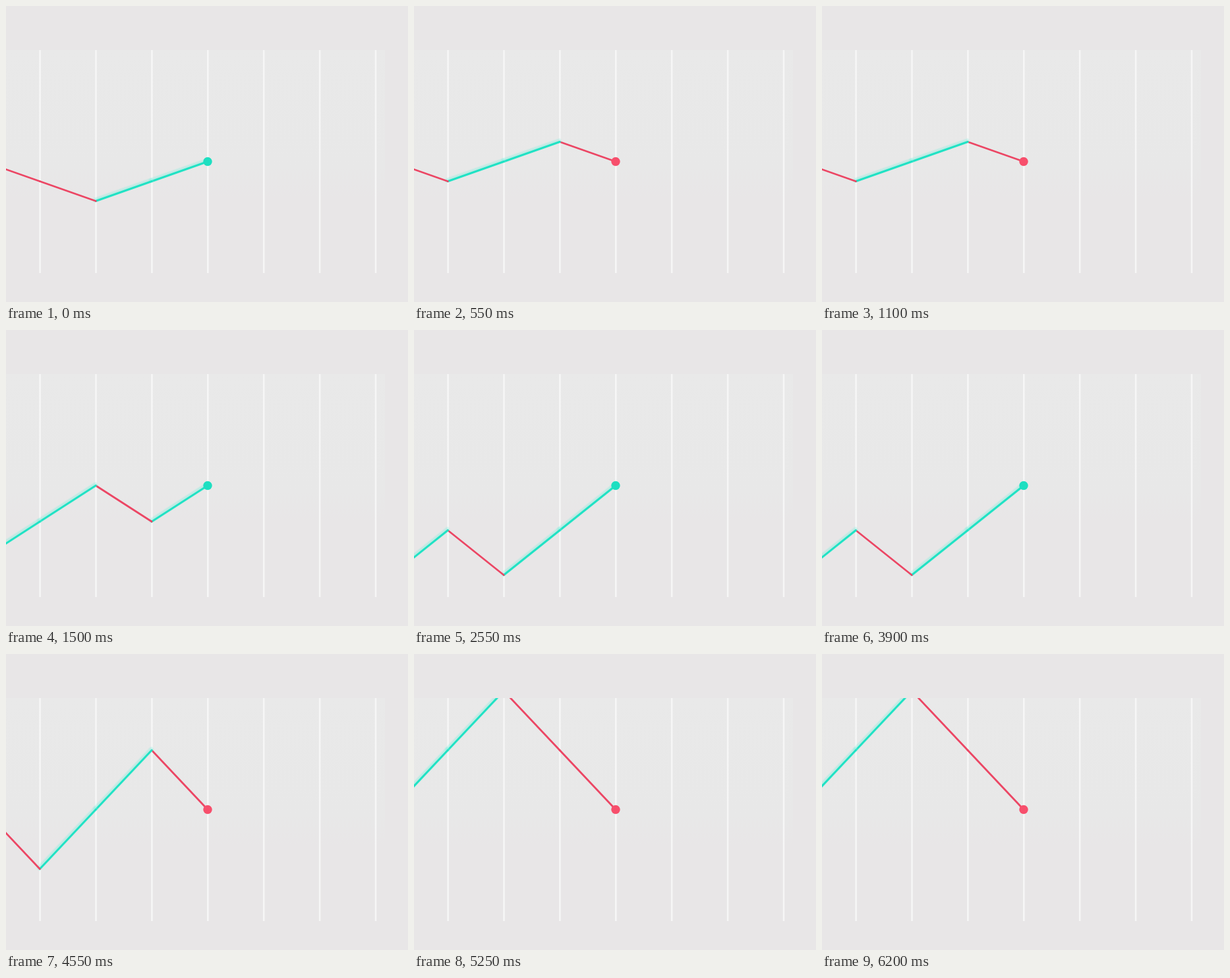
An HTML page with a canvas that plays this animation: 610 px wide and 450 px high, repeating every 6250 ms.

```html
<!DOCTYPE html>
<html lang="en">
<head>
<meta charset="utf-8">
<title>Ticker line</title>
<style>
  html, body { margin: 0; width: 610px; height: 450px; overflow: hidden; background: #e8e6e7; }
  canvas { display: block; }
</style>
</head>
<body>
<canvas id="chart" width="610" height="450"></canvas>
<script>
  const ctx = document.getElementById('chart').getContext('2d');

  const LOOP = 6250;
  const TOP = 67, BOTTOM = 406, GAP = 84.9;
  const HEAD = { x: 306, y: 236.5 };
  const UP = '#20e2c4', DOWN = '#ec4664';
  const DOT = { U: '#1edfc1', D: '#f74f6c' };

  // Direction of every move; each view shows the last four up to its own tick.
  const MOVES = 'DDUUDUUDD';
  const SHOWN = 4;
  const VIEWS = [
    { at: 0, rise: 30 },
    { at: 100, rise: 30 },
    { at: 1200, rise: 54.8 },
    { at: 2550, rise: 68 },
    { at: 3950, rise: 90.2 },
    { at: 5250, rise: 90.2 }
  ];

  function drawBackground() {
    ctx.fillStyle = '#e8e6e7';
    ctx.fillRect(0, 0, 610, 450);
    const shade = ctx.createLinearGradient(0, TOP, 0, 290);
    shade.addColorStop(0, '#e9e9e9');
    shade.addColorStop(0.8, '#e8e8e8');
    shade.addColorStop(1, '#e8e6e7');
    ctx.fillStyle = shade;
    ctx.fillRect(0, TOP, 575, 290 - TOP);

    ctx.fillStyle = '#f6f6f6';
    for (let i = -3; i <= 3; i++) {
      ctx.fillRect(HEAD.x + i * GAP - 1, TOP, 2.6, BOTTOM - TOP);
    }
  }

  function stroke(a, b, color, width) {
    ctx.strokeStyle = color;
    ctx.lineWidth = width;
    ctx.beginPath();
    ctx.moveTo(a.x, a.y);
    ctx.lineTo(b.x, b.y);
    ctx.stroke();
  }

  function drawMove(a, b, dir) {
    if (dir === 'D') return stroke(a, b, DOWN, 2.8);
    const lift = p => ({ x: p.x - 0.8, y: p.y - 1.4 });
    stroke(lift(a), lift(b), 'rgba(120, 238, 218, 0.18)', 8);
    stroke(lift(a), lift(b), 'rgba(120, 238, 218, 0.25)', 5);
    stroke(a, b, UP, 3);
  }

  function drawLine(index) {
    const rise = VIEWS[index].rise;
    const moves = MOVES.slice(index, index + SHOWN);
    ctx.save();
    ctx.beginPath();
    ctx.rect(0, TOP, 610, BOTTOM - TOP);
    ctx.clip();
    ctx.lineCap = 'round';

    let end = HEAD;
    for (let i = SHOWN - 1; i >= 0; i--) {
      const start = {
        x: end.x - GAP,
        y: end.y + (moves[i] === 'U' ? rise : -rise)
      };
      drawMove(start, end, moves[i]);
      end = start;
    }

    ctx.fillStyle = DOT[moves[SHOWN - 1]];
    ctx.beginPath();
    ctx.arc(HEAD.x, HEAD.y, 6.7, 0, Math.PI * 2);
    ctx.fill();
    ctx.restore();
  }

  let shown = -1;
  function render() {
    const t = performance.now() % LOOP;
    const index = VIEWS.filter(v => v.at <= t).length - 1;
    if (index !== shown) {
      drawBackground();
      drawLine(index);
      shown = index;
    }
    requestAnimationFrame(render);
  }
  render();
</script>
</body>
</html>
```
